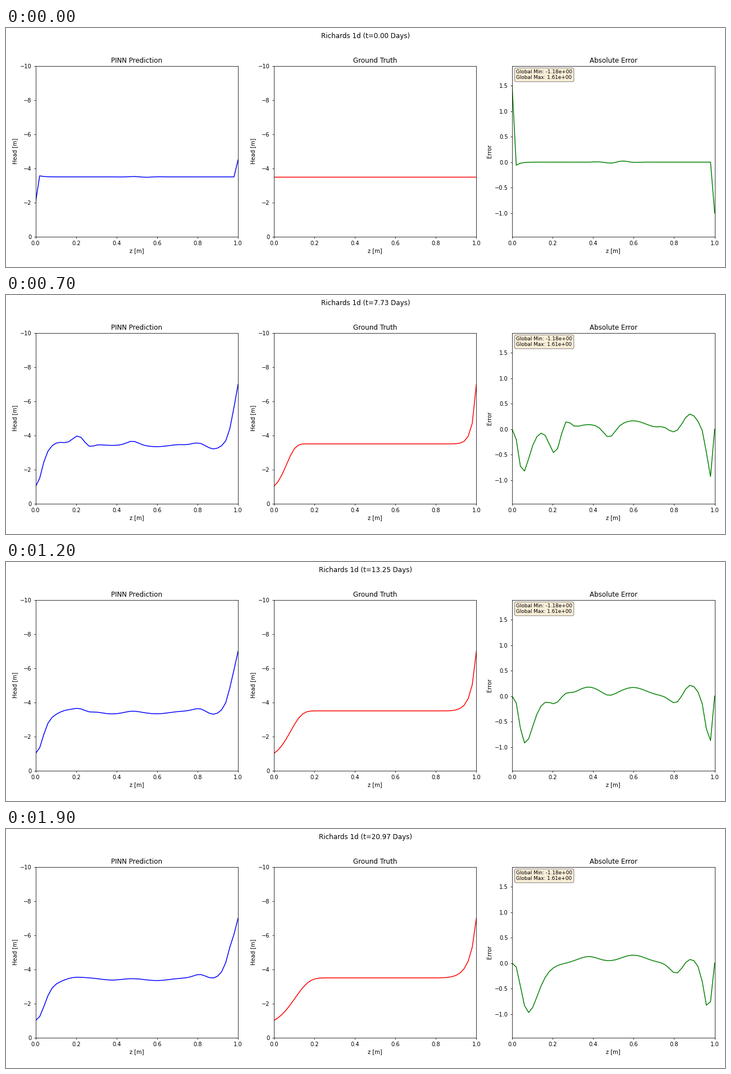
A matplotlib script that plays this animation: 1280 px wide and 427 px high, repeating every 2 s.

```python
import numpy as np
import matplotlib.pyplot as plt
from matplotlib.animation import FuncAnimation

W, H = 1280, 427
FRAMES = 20
DAY_STEP = 1.1038
I = np.arange(50)
Z = I / 49

# Swells of the interior error: sample, width, height, moment, lifetime.
SWELLS = [
    (10.3, 1.3, -0.48, 7.5, 4),
    (13.0, 1.0, 0.20, 8, 3.5),
    (18.5, 2.6, 0.19, 14, 8),
    (23.5, 1.3, -0.20, 7, 4),
    (29.3, 3.1, 0.17, 12, 25),
    (36.5, 1.0, 0.25, 3, 3),
    (39.8, 1.5, -0.22, 18, 12),
    (43.0, 1.8, 0.32, 4, 14),
]


def bell(x, center, width):
    return np.exp(-((x - center) / width) ** 2)


def trough(dist, peak, power):
    """Zero at the wall, one at the peak, then a smooth decay."""
    u = dist / peak
    return u**power * np.exp(power * (1 - u))


def truth(n):
    """Both fronts spread with the square root of time."""
    if n == 0:
        return np.full(50, -3.5)
    scale = np.sqrt(12 / n)
    x, j = I * scale, (49 - I) * scale
    left = 3.5 - 2.5 * np.exp(-0.066 * x * np.exp(0.25 * x))
    right = 3.5 * np.exp(-0.75 * j - 0.09 * (1 - np.exp(-2 * j)) - 0.0006 * j**4)
    return -(left + right)


def start_error():
    err = 0.025 * np.cos(0.9 * (I - 27)) * bell(I, 25.5, 4) - 0.06 * np.exp(1.0 - I)
    err[0], err[-1] = 1.5, -1
    return err


def error(n):
    if n == 0:
        return start_error()
    depth = 0.93 * (1 - bell(n, 0, 4.5)) + 0.24 * bell(n, 17, 1.5)
    err = -depth * trough(I, 1.9 + 0.11 * n, 4)
    err -= 0.95 * trough(49 - I, 0.85 + 0.035 * n, 3)
    for center, width, height, moment, life in SWELLS:
        level = height * bell(n, moment, life) * min(n / 3, 1)
        err += level * bell(I, center, width * np.sqrt(2))
    return err


def heading(n):
    return f"Richards 1d (t={n * DAY_STEP:.2f} Days)"


fig, axes = plt.subplots(1, 3, figsize=(18, 6.00469), dpi=640 / 9)
fig.subplots_adjust(left=52.6 / W, right=1261.6 / W, top=1 - 67.8 / H,
                    bottom=1 - 372.7 / H, wspace=63.6 / 360.6)
suptitle = fig.suptitle(heading(0), y=0.981)

panels = [
    ("PINN Prediction", "Head [m]", (0, -10), "blue"),
    ("Ground Truth", "Head [m]", (0, -10), "red"),
    ("Absolute Error", "Error", (-1.464, 1.89), "green"),
]
lines = []
for ax, (title, ylabel, ylim, color) in zip(axes, panels):
    ax.set(title=title, xlabel="z [m]", ylabel=ylabel, xlim=(0, 1), ylim=ylim)
    lines += ax.plot(Z, np.zeros(50), color=color)

axes[2].text(0.02, 0.98, "Global Min: -1.18e+00\nGlobal Max: 1.61e+00",
             transform=axes[2].transAxes, fontsize=9, va="top",
             bbox=dict(boxstyle="round", facecolor="wheat", alpha=0.5))


def update(n):
    h, err = truth(n), error(n)
    for line, y in zip(lines, (h + err, h, err)):
        line.set_ydata(y)
    suptitle.set_text(heading(n))
    return [*lines, suptitle]


anim = FuncAnimation(fig, update, frames=FRAMES, interval=100, repeat=True,
                     repeat_delay=0, blit=False)
plt.show()
```
